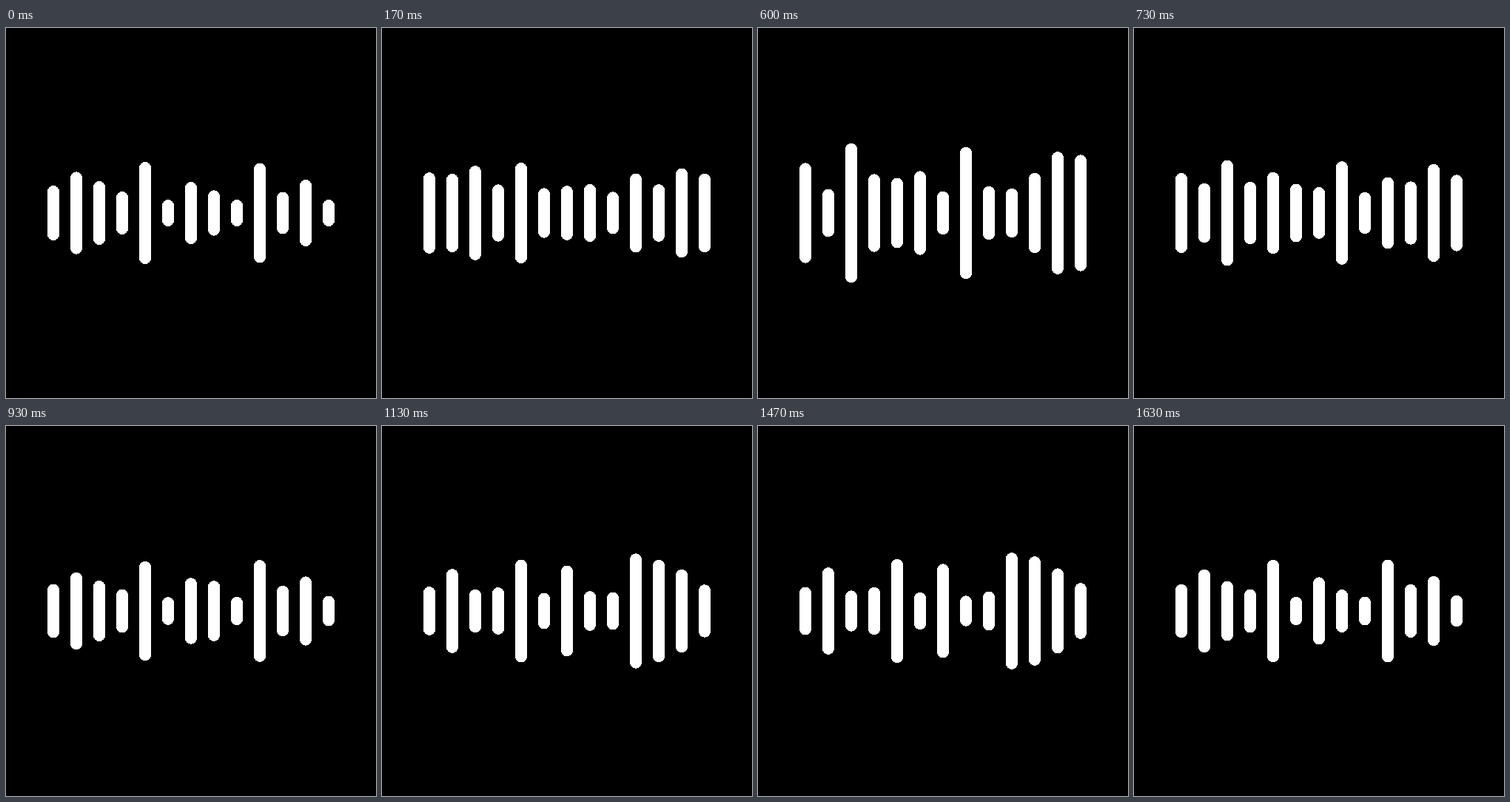
These frames come from a looping animation (500x500 px, 1.67 s). An HTML page:

```html
<!DOCTYPE html>
<html lang="en">
<head>
<meta charset="utf-8">
<title>Sound bars</title>
<style>
  html, body { margin: 0; width: 100%; height: 100%; overflow: hidden; background: #000; }
  svg { display: block; width: 100%; height: 100%; }
</style>
</head>
<body>
<svg id="stage" viewBox="0 0 500 500" fill="#fff" shape-rendering="crispEdges"></svg>
<script>
const LOOP = 1670, STEPS = 50, WIDTH = 16, GAP = 31, LEFT = 56, MID = 250;

// Three poses, as half heights from left to right.
const REST  = [37, 53, 43, 29, 68, 18, 42, 39, 18, 67.5, 28.5, 45, 18];
const SWELL = [84, 30, 108, 59, 38, 67, 26, 95, 46, 24, 61, 93, 111];
const ECHO  = [29.5, 61, 17.5, 34.5, 71, 30, 78, 14, 32, 86.5, 104, 66, 51];

const stage = document.getElementById('stage');

// Each bar goes rest, swell, rest, echo, rest in straight lines.
const bars = REST.map((rest, i) => {
  const late = i % 3 === 1 && i < 9;
  const on = late ? 5 : 0;
  const peak = i % 4 ? (late ? 16.8 : 15.6) : 13.2;
  const back = late ? 28.4 : 27;
  const rect = document.createElementNS('http://www.w3.org/2000/svg', 'rect');
  rect.setAttribute('x', LEFT + i * GAP);
  rect.setAttribute('width', WIDTH);
  rect.setAttribute('rx', WIDTH / 2);
  stage.appendChild(rect);
  return {
    rect,
    times: [on, peak, back, 40, on + STEPS],
    sizes: [rest, SWELL[i], rest, ECHO[i], rest]
  };
});

function halfHeight({ times, sizes }, step) {
  const s = step < times[0] ? step + STEPS : step;
  const k = times.findIndex(t => t > s);
  const p = (s - times[k - 1]) / (times[k] - times[k - 1]);
  return sizes[k - 1] + (sizes[k] - sizes[k - 1]) * p;
}

// Thirty steps a second, snapped to hundredths: 0, 30, 70, 100 ms ...
function stepAt(ms) {
  const rest = ms % 100;
  return 3 * Math.floor(ms / 100) + (rest >= 30) + (rest >= 70);
}

function draw(ms) {
  const step = stepAt(ms % LOOP);
  for (const bar of bars) {
    const h = halfHeight(bar, step);
    bar.rect.setAttribute('y', MID - h);
    bar.rect.setAttribute('height', 2 * h);
  }
}

const start = performance.now();
function tick() {
  draw(performance.now() - start);
  requestAnimationFrame(tick);
}
tick();
</script>
</body>
</html>
```
